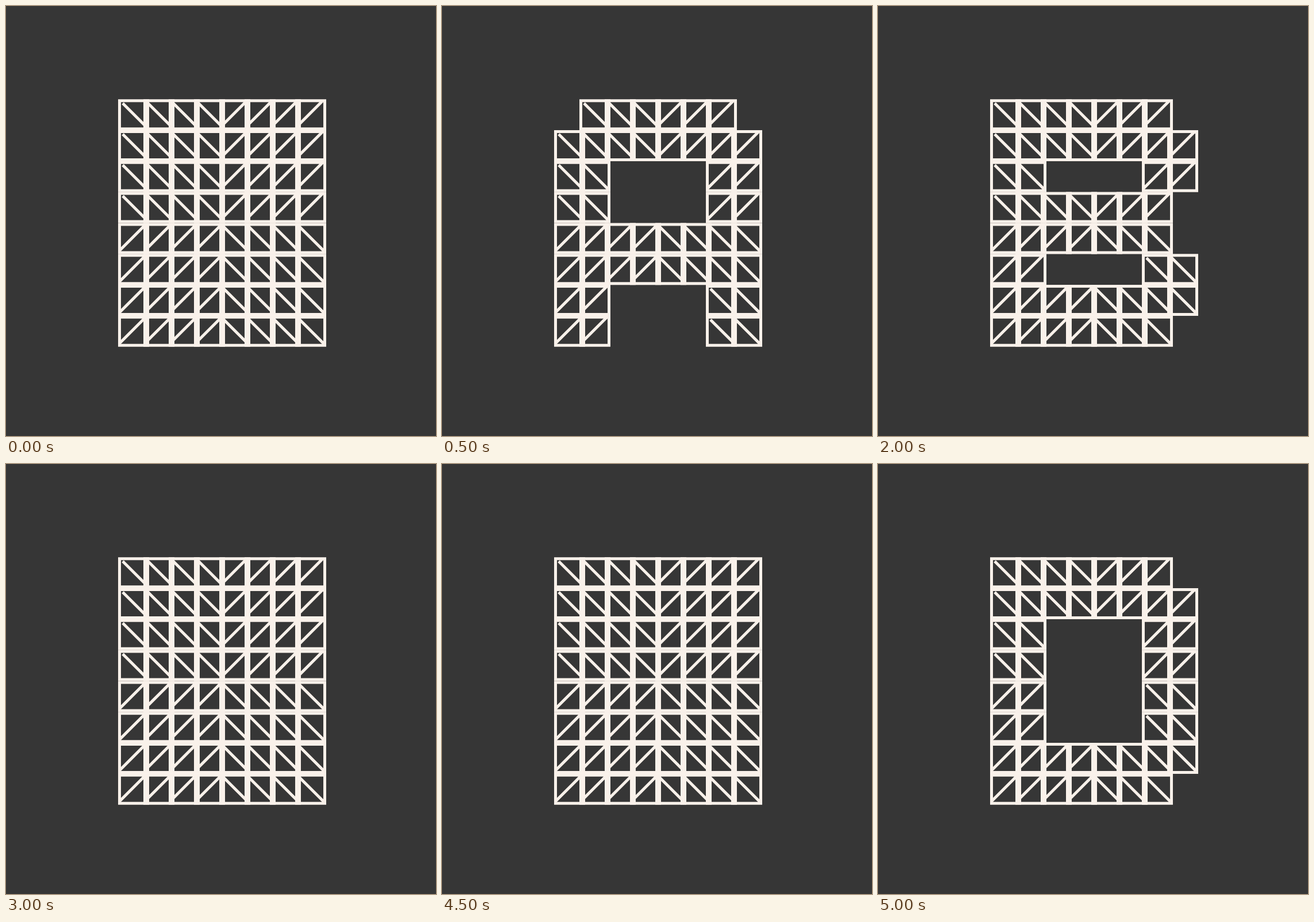
An HTML page for the animation above (6 s loop, 748x748 px).

```html
<!DOCTYPE html>
<html lang="en">
<head>
<meta charset="utf-8">
<title>Lattice letters</title>
<style>
  html, body { margin: 0; width: 100%; height: 100%; overflow: hidden; background: #363636; }
  svg { display: block; width: 100%; height: 100%; }
  path { fill: none; stroke: #f9f1ea; stroke-width: 5; }
</style>
</head>
<body>
<svg id="stage" viewBox="0 0 748 748"></svg>
<script>
const FULL = Array(8).fill("########");
const SIDES = "##....##";
const CAP = ".######.";
const BAR = "########";
const LEFT = "#######.";

const A = [CAP, BAR, SIDES, SIDES, BAR, BAR, SIDES, SIDES];
const B = [LEFT, BAR, SIDES, LEFT, LEFT, SIDES, BAR, LEFT];
const C = [CAP, BAR, SIDES, "##......", "##......", SIDES, BAR, CAP];
const D = [LEFT, BAR, SIDES, SIDES, SIDES, SIDES, BAR, LEFT];

// [start in ms, lattice shown from then on]
const STEPS = [
  [0, FULL], [500, A], [1500, FULL], [2000, B],
  [3000, FULL], [3500, C], [4500, FULL], [5000, D]
];
const LOOP = 6000;

const LEFT_X = 195, TOP_Y = 162.2;
const STEP_X = 44, STEP_Y = 53.8;   // cells are wider than their step, so sides overlap
const FRAME = "M2.5 2.5H51.5V51.5H2.5Z";
const FALLING = "M8 7L52.4 51.2";
const RISING = "M2.5 48L48 2.5";

const stage = document.getElementById("stage");

function makeCell(row, col) {
  const path = document.createElementNS("http://www.w3.org/2000/svg", "path");
  const diagonal = (row < 4) === (col < 4) ? FALLING : RISING;
  path.setAttribute("d", FRAME + diagonal);
  path.setAttribute("transform", `translate(${LEFT_X + col * STEP_X} ${TOP_Y + row * STEP_Y})`);
  stage.append(path);
  return path;
}

const cells = FULL.map((line, row) => [...line].map((_, col) => makeCell(row, col)));

let shown = null;
function show(lattice) {
  if (lattice === shown) return;
  shown = lattice;
  cells.forEach((line, row) => line.forEach((cell, col) => {
    cell.style.display = lattice[row][col] === "#" ? "" : "none";
  }));
}

const start = performance.now();
function tick() {
  const time = (performance.now() - start) % LOOP;
  show(STEPS.findLast(([from]) => time >= from)[1]);
  requestAnimationFrame(tick);
}
tick();
</script>
</body>
</html>
```
